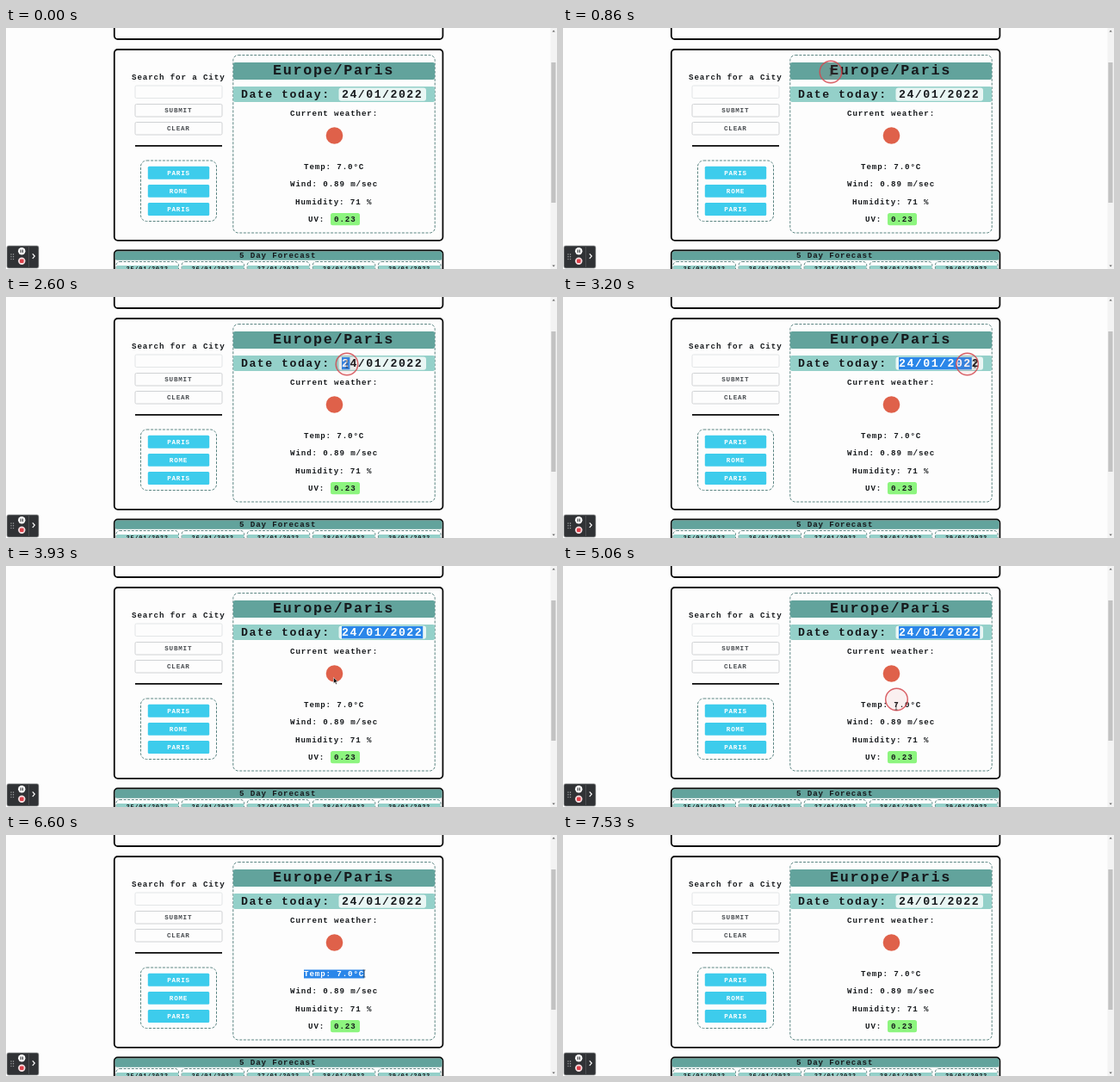
An HTML page for the animation above (8000 ms loop, 640 by 280 pixels).

```html
<!DOCTYPE html>
<html lang="en">
<head>
<meta charset="utf-8">
<style>
  html, body { margin: 0; width: 100%; height: 100%; overflow: hidden; background: #fdfdfd; }
  svg { display: block; width: 640px; height: 280px; }
  text { font-family: "Liberation Mono", monospace; font-weight: bold; fill: #16191c; white-space: pre; }
  .title { font-size: 16.8px; letter-spacing: 1.67px; }
  .date { font-size: 13.2px; letter-spacing: 1.5px; }
  .body { font-size: 9.2px; letter-spacing: .87px; }
  .label { font-size: 7.6px; letter-spacing: .76px; }
  .day { font-size: 7.1px; letter-spacing: .65px; }
  .grey { fill: #484c50; }
  .white { fill: #fff; }
  .panel { fill: #fdfdfd; stroke: #0b0b0b; stroke-width: 1.8; }
  .dashed { fill: none; stroke: #5b8582; stroke-width: 1; stroke-dasharray: 3 1.6; }
  .field { fill: #fdfdfd; stroke: #e2e5e7; stroke-width: 1; }
  .button { fill: #fdfdfd; stroke: #d0d2d4; stroke-width: 1; }
  .teal { fill: #62a39c; }
  .mint { fill: #94d0c9; }
  .city { fill: #3dccec; }
  .select { fill: #2a86e9; }
</style>
</head>
<body>
<svg id="stage" viewBox="0 0 640 280"></svg>
<script>
const stage = document.getElementById('stage');

function add(tag, attrs, content = '') {
  const node = document.createElementNS('http://www.w3.org/2000/svg', tag);
  for (const key in attrs) node.setAttribute(key, attrs[key]);
  node.textContent = content;
  return stage.appendChild(node);
}
const box = (x, y, width, height, cls, rx = 0) => add('rect', { x, y, width, height, rx, class: cls });
const fillBox = (x, y, width, height, fill, rx = 0) => add('rect', { x, y, width, height, rx, fill });
const dot = (cx, cy, r, fill) => add('circle', { cx, cy, r, fill });
const write = (x, y, cls, content) => add('text', { x, y, class: cls }, content);
const line = (d, stroke, width) => add('path', { d, stroke, 'stroke-width': width, fill: 'none' });

function drawPage() {
  fillBox(0, 0, 640, 280, '#fdfdfd');
  box(125.8, -20, 381.6, 33, 'panel', 4);
  box(125.8, 25, 381.6, 221.8, 'panel', 4);

  write(146, 60, 'body', 'Search for a City');
  box(150, 67, 101, 14.5, 'field', 1.5);
  box(150, 88.5, 101, 14.5, 'button', 1.5);
  box(150, 109.5, 101, 14.5, 'button', 1.5);
  write(184.3, 98.2, 'label grey', 'SUBMIT');
  write(187, 119.2, 'label grey', 'CLEAR');
  fillBox(150, 136, 101, 1.8, '#111');

  box(156.5, 154, 88, 70.5, 'dashed', 7);
  ['PARIS', 'ROME', 'PARIS'].forEach((name, i) => {
    const y = 160.8 + i * 21.1;
    box(164.8, y, 71.4, 14.9, 'city', 1.5);
    write(200.5 - name.length * 2.66, y + 9.9, 'label white', name);
  });

  box(263.8, 31.5, 234.4, 206.5, 'dashed', 6);
  box(264, 40, 234, 20, 'teal', 2);
  write(310, 54.3, 'title', 'Europe/Paris');
  box(264, 68, 234, 18, 'mint', 2);
  write(273, 80.8, 'date', 'Date today:');
  fillBox(386.5, 69.5, 101.5, 15.3, '#e9f6f4', 3);
  write(390, 80.8, 'date', '24/01/2022');
  write(330, 101.6, 'body', 'Current weather:');
  dot(381.5, 125, 9.8, '#df614a');
  write(346, 164, 'body', 'Temp: 7.0°C');
  write(330, 184.4, 'body', 'Wind: 0.89 m/sec');
  write(336, 204.7, 'body', 'Humidity: 71 %');
  write(351, 225, 'body', 'UV:');
  fillBox(377, 215, 34, 14.2, '#8df57f', 2.5);
  write(381, 225, 'body', '0.23');

  box(125.8, 258.5, 381.6, 60, 'panel', 4);
  box(126.7, 259.4, 379.8, 10.4, 'teal', 2);
  write(271, 267, 'body', '5 Day Forecast');
  for (let i = 0; i < 5; i++) {
    const x = 128 + i * 76.1;
    box(x, 271.5, 72.5, 40, 'dashed', 4);
    box(x + .5, 276, 71.5, 10, 'mint');
    write(x + 11.5, 282, 'day', `${25 + i}/01/2022`);
  }

  fillBox(632.5, 0, 7.5, 280, '#f3f3f3');
  fillBox(633.3, 40, 5.2, 163, '#c2c2c2');
  add('path', { d: 'M634.4 4.5l1.7-2 1.7 2zM634.4 275.5l1.7 2 1.7-2z', fill: '#666' });

  add('rect', { x: 1, y: 253, width: 37, height: 26, rx: 2, fill: '#303235', stroke: '#a5a6a8', 'stroke-width': .7 });
  fillBox(26, 253.5, 1, 25, '#4a4c4f');
  for (let i = 0; i < 6; i++) dot(6 + (i % 2) * 2.6, 263 + (i >> 1) * 2.8, .7, '#a9abad');
  dot(18.3, 259.3, 4.2, '#fff');
  line('M17.2 257.5v3.6M19.4 257.5v3.6', '#303235', 1.1);
  dot(18.3, 270.7, 4.2, '#f6dfe1');
  fillBox(16, 268.4, 4.6, 4.6, '#dc3f49', 1.2);
  line('M30.8 262.3l2.5 2.8-2.5 2.8', '#fff', 1.2);
}

// Pointer stops: time, x, y
const path = [
  [60, 385, 96], [660, 311, 51], [860, 311, 51], [1380, 449, 52], [1730, 449, 52],
  [2260, 396, 78], [2600, 396, 78], [3330, 486, 78], [3460, 486, 78],
  [3900, 380.5, 129.5], [4000, 380.5, 129.5], [4260, 384, 126], [4330, 384, 126],
  [4460, 382, 132], [4800, 382, 132], [4990, 387.5, 155], [5060, 387, 163],
  [5150, 387, 163], [5600, 348, 161], [5860, 348, 161], [6260, 416, 161],
  [6860, 416, 161], [7530, 638, 120]
];
const presses = [[860, 1660], [2600, 3400], [4930, 5200], [5660, 6260]];
const selections = [
  { text: 'Europe/Paris', cls: 'title', x: 310, baseline: 54.3, top: 41.5, height: 17.3, advance: 11.75, start: 860, end: 2600 },
  { text: '24/01/2022', cls: 'date', x: 390, baseline: 80.8, top: 70, height: 14.3, advance: 9.42, start: 2600, end: 5130 },
  { text: 'Temp: 7.0°C', cls: 'body', x: 346, baseline: 164, top: 156.5, height: 10, advance: 6.39, start: 5870, end: 6860 }
];

const clamp = (v, low, high) => Math.min(high, Math.max(low, v));

function pointerAt(t) {
  const next = path.findIndex(stop => stop[0] > t);
  if (next < 0) return path[path.length - 1].slice(1);
  if (next === 0) return path[0].slice(1);
  const [t0, x0, y0] = path[next - 1], [t1, x1, y1] = path[next];
  const p = (t - t0) / (t1 - t0), eased = p * p * (3 - 2 * p);
  return [x0 + (x1 - x0) * eased, y0 + (y1 - y0) * eased];
}

drawPage();
for (const s of selections) {
  s.back = box(s.x, s.top, 0, s.height, 'select');
  s.front = write(s.x, s.baseline, s.cls + ' white', '');
}
const ring = add('circle', { r: 12.8, fill: '#d9505018', stroke: '#d4484f', 'stroke-width': 1.5 });
const arrow = add('path', { d: 'M0 0v7l1.6-1.5 1.1 2.5 1.2-.5-1.1-2.4h2.2z', fill: '#111', stroke: '#fff', 'stroke-width': .5 });
const beam = add('path', { d: 'M-1.5-4h3M0-4v8M-1.5 4h3', stroke: '#222', 'stroke-width': .6 });

function render(t) {
  for (const s of selections) {
    const active = t >= s.start && t < s.end;
    const dragTime = Math.min(t, s.start + 800);
    const count = active ? clamp(Math.round((pointerAt(dragTime)[0] - s.x) / s.advance), 0, s.text.length) : 0;
    s.back.setAttribute('width', count * s.advance);
    s.front.textContent = s.text.slice(0, count);
  }

  const [x, y] = pointerAt(t);
  const shown = t >= 60 && t < 7530;
  const overText = x < 490 && (y < 86 || y > 153);
  for (const [node, visible] of [[arrow, shown && !overText], [beam, shown && overText]]) {
    node.setAttribute('transform', `translate(${x} ${y})`);
    node.setAttribute('visibility', visible ? 'visible' : 'hidden');
  }

  // The click ring trails slightly behind the pointer.
  const [rx, ry] = pointerAt(t - 70);
  const pressed = presses.some(([from, to]) => t >= from && t < to);
  ring.setAttribute('cx', rx);
  ring.setAttribute('cy', ry);
  ring.setAttribute('opacity', pressed ? .85 : 0);
}

function tick() {
  render(performance.now() % 8000);
  requestAnimationFrame(tick);
}
tick();
</script>
</body>
</html>
```
